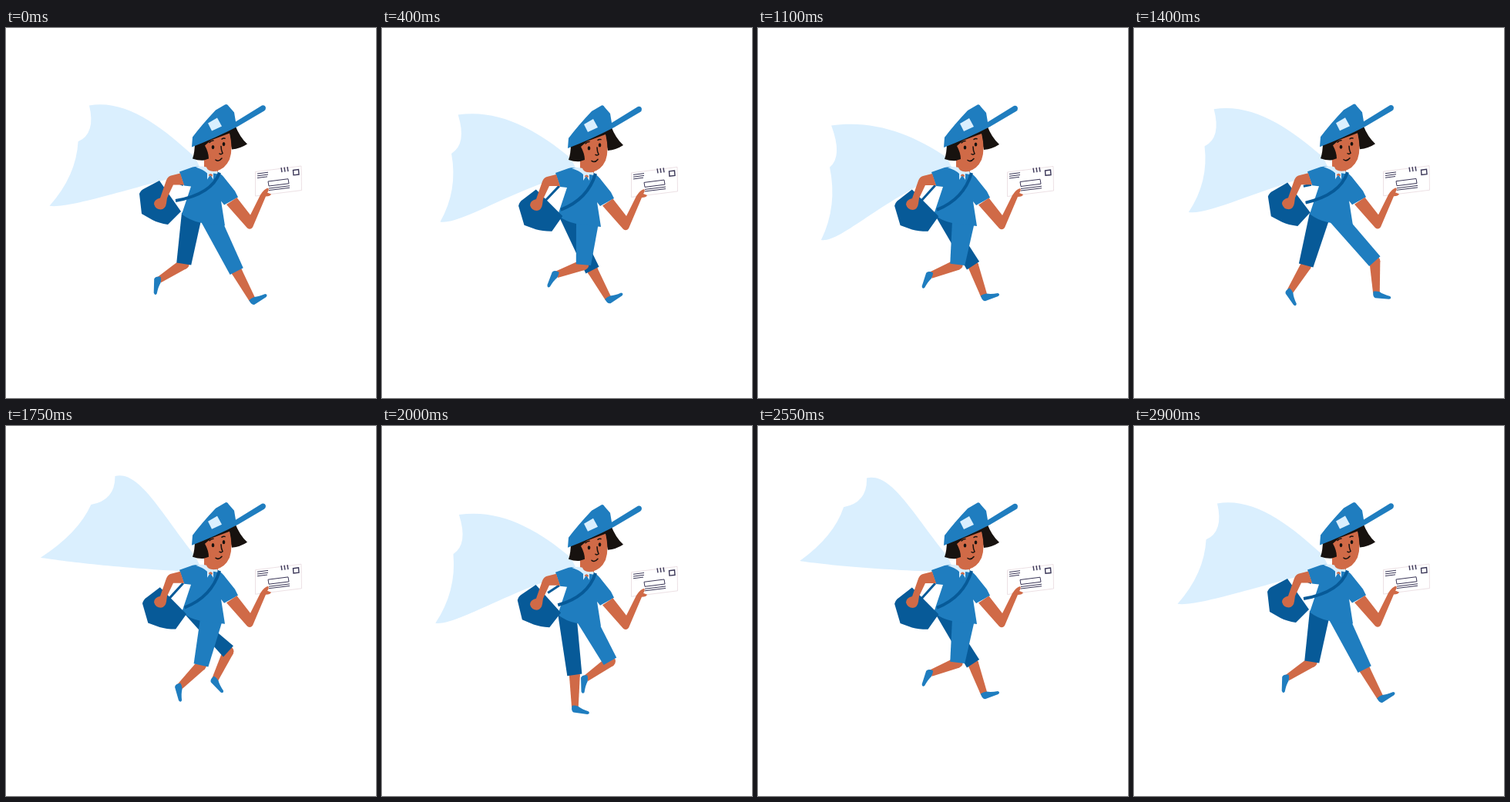
An HTML page that plays this animation: 480x480 px, repeating every 2950 ms.

```html
<!DOCTYPE html>
<html lang="en">
<head>
<meta charset="utf-8">
<title>Running courier</title>
<style>
  html, body { margin: 0; width: 100%; height: 100%; overflow: hidden; background: #fff; }
  svg { display: block; width: 100vw; height: 100vh; }
  .blue { fill: #1f7dbf; }
  .navy { fill: #075a98; }
  .skin { fill: #d06a47; }
  .hair { fill: #17120f; }
  .pale { fill: #daeffe; }
  .strap { fill: none; stroke: #075a98; stroke-width: 4; }
  .ink { fill: none; stroke: #3a3657; stroke-width: 1; }
  .face { fill: none; stroke: #17120f; stroke-width: 1.5; stroke-linecap: round; }
</style>
</head>
<body>
<svg viewBox="0 0 480 480">
  <path id="cape" class="pale"/>
  <g id="farLeg">
    <path class="skin shin"/><circle class="skin knee" r="7"/>
    <path class="blue foot"/><path class="navy thigh"/>
  </g>
  <g id="nearLeg">
    <path class="skin shin"/><circle class="skin knee" r="7"/>
    <path class="blue foot"/><path class="blue thigh"/>
  </g>
  <path id="backStrap" class="strap" style="stroke-width:3"/>

  <g class="bob">
    <path class="skin" d="M257 166L257 184Q264 194 274 187L277 178Z"/>
    <path class="blue" d="M225 185L242 179Q250 177 257 180Q264 190 274 185Q280 188 285 195L297 210L301 218L283 228L279 223L284 255L252 251Q238 248 228 240L240 204L231 203Z"/>
    <path class="pale" d="M246 179Q254 177 260 179Q262 186 274 184L275 188L269 187L269 195L265 189L261 195L261 187Q256 182 246 179Z"/>
    <path class="skin" d="M263 189Q265 186 268 189L267 192Q265 188 263 191Z"/>
  </g>

  <path id="bag" class="navy" d="M199 198L227 238L210 255Q198 253 190 249L176 241L173 215Q175 210 180 208Z"/>
  <path id="frontStrap" class="strap"/>

  <g class="bob">
    <path class="skin" d="M226 187L214 190Q210 191 208 196L200 219Q192 221 192 227Q194 234 201 234Q207 233 208 226L209 219L217 202L231 202Z"/>

    <path d="M323.500 185L383 177.500L383.500 209L323.500 216.500Z" fill="#fff" stroke="#e8d8de" stroke-width=".8"/>
    <path class="ink" d="M326 187.500l14 -1.800M326 190.300l14 -1.800M326 193l13 -1.700M340 197.500l26 -3.300l1 6l-26 3.300zM341 209l27 -3.300M341 206.500l27 -3.300"/>
    <path class="ink" style="stroke-width:1.400" d="M357 179.500l1 6M361 179l1 6M365 178.500l1 6M372.500 183l7 -.9l.5 6.400l-7 .8z"/>
    <path class="skin" d="M286 227.500L299.500 218.500L317 241L330 215Q335 207 340 206Q342 208 339 212L344 214Q343 217 337 217L320 257Q317 261 313 258Z"/>

    <path class="hair" d="M245 146Q245 160 242 168Q253 172 263 169L270 150L290 136Q290 146 293 156Q304 155 313 149Q303 140 297 124Z"/>
    <path class="skin" d="M258 151L266 144L290 135Q295 155 290 169Q284 182 272 184Q260 181 257 170L263 168Q263 160 258 151Z"/>
    <ellipse class="hair" cx="268.500" cy="153" rx="1.800" ry="2.600"/>
    <ellipse class="hair" cx="282.500" cy="149" rx="1.800" ry="2.600"/>
    <path class="face" d="M264 147q2 -2.500 5 -2.500M280 142.500q2 -1.500 4 -.8M279 152q0 5 2 9q-2 2 -4 .5M272 169.500q4 3 8 -2"/>
    <path class="blue" d="M241 153L242 140Q254 124 272 105L284 98Q287 96 289 100L296 108L298 120L332 99Q336 98 337 102Q337 105 335 106L301 126Q270 142 241 153Z"/>
    <path class="pale" d="M262 122L274 115L280 126L267 132Z"/>
  </g>
</svg>

<script>
const LOOP = 2950, STEP = 50, STRIDE = 725, WAVE = 2900 / 3;
const FAR_LAG = .45;
const $ = s => document.querySelector(s);
const setD = (el, d) => el.setAttribute('d', d);
const move = (el, t) => el.setAttribute('transform', t);
const wave = (p, peak = 0) => Math.cos(2 * Math.PI * (p - peak));

// One stride from heel strike: phase, thigh angle, shin angle (degrees forward of straight down).
const stride = [
  [0, 27, 29], [.1, 22, 8], [.24, 3, -2], [.347, -16, -20],
  [.45, -9, -57], [.55, -5, -70], [.72, 23, -62], [.88, 48, -20]
];

// Smooth periodic interpolation through the stride poses.
function pose(time) {
  const u = time - Math.floor(time), n = stride.length;
  const key = i => {
    const [p, ...v] = stride[(i + n) % n];
    return { p: p + Math.floor(i / n), v };
  };
  let i = n - 1;
  while (stride[i][0] > u) i--;
  const [a, b, c, d] = [-1, 0, 1, 2].map(k => key(i + k));
  const h = c.p - b.p, s = (u - b.p) / h, r = 1 - s;
  return b.v.map((v, j) => {
    const w = c.v[j];
    const m0 = (w - a.v[j]) / (c.p - a.p) * h;
    const m1 = (d.v[j] - v) / (d.p - b.p) * h;
    return r * r * ((1 + 2 * s) * v + s * m0) + s * s * ((1 + 2 * r) * w - r * m1);
  });
}

function drawLeg(id, phase, [lx, ly], [rx, ry], [hx, hy]) {
  const leg = $(id), part = c => leg.querySelector('.' + c);
  const [thigh, shin] = pose(phase);
  const dir = deg => [Math.sin(deg * Math.PI / 180), Math.cos(deg * Math.PI / 180)];
  const [tx, ty] = dir(thigh), [sx, sy] = dir(shin);
  const reach = wave(phase, .1);
  const kx = hx + tx * (65 + 10 * reach), ky = hy + ty * (65 + 10 * reach);
  const ax = kx + sx * (40 + 3 * reach), ay = ky + sy * (40 + 3 * reach);
  const side = (x, y, ux, uy, r) => `${x + uy * r} ${y - ux * r} `;
  setD(part('thigh'), `M${lx} ${ly}L${side(kx, ky, tx, ty, -9.6)}L${side(kx, ky, tx, ty, 9.6)}L${rx} ${ry}Z`);
  setD(part('shin'), `M${side(kx, ky, sx, sy, -7)}L${side(ax, ay, sx, sy, -4.3)}L${side(ax, ay, sx, sy, 4.3)}L${side(kx, ky, sx, sy, 7)}Z`);
  move(part('knee'), `translate(${kx} ${ky})`);
  move(part('foot'), `translate(${ax} ${ay}) rotate(${9 - 1.45 * shin})`);
}

function drawCape(q, dy) {
  const flutter = -5 * wave(2 * q, .92);
  const lift = wave(q, .735);
  const top = [115 + 28 * lift + flutter, 97 - 36 * lift];
  const notch = [99 + 11 * lift + flutter, 143 - 46 * lift];
  const low = [65 - 22 * wave(q, .78) + flutter, 225 - 61 * lift];
  const bend = (a, b, x, y) => [(a[0] + b[0]) / 2 + x, (a[1] + b[1]) / 2 + y];
  const lowPull = [155, low[1] * .4 + 117];
  const topPull = [201, top[1] * .4 + 87];
  setD($('#cape'), `M${top}Q${bend(top, notch, 16, 13)} ${notch}Q${bend(notch, low, 16, 3)} ${low}
    C${low[0] + 24} ${low[1] + 4} ${lowPull} 240 ${187 + dy}L252 ${180 + dy}L245 ${166 + dy}
    C${topPull} ${top[0] / 2 + 102} ${top[1] - 8} ${top}Z`);
}

function drawBag(s, dy) {
  move($('#bag'), `translate(${6 * s} ${11 * s}) rotate(${-10 * s} 200 228)`);
  const y = 224 + 12 * s;
  setD($('#frontStrap'), `M277 ${186 + dy}Q267 ${(186 + dy + y) / 2 + 10} ${220 + 12 * s} ${y}`);
  setD($('#backStrap'), `M230 ${202 + dy}L${222 - 10 * s} ${200 + 24 * s}`);
}

function draw(t) {
  const run = t / STRIDE;
  const dy = .4 + 4.6 * Math.abs(Math.sin(Math.PI * (2 * run + .08)));
  document.querySelectorAll('.bob').forEach(g => move(g, `translate(0 ${dy})`));
  drawLeg('#farLeg', run + FAR_LAG, [228, 238 + dy], [253, 248 + dy], [240, 246 + dy]);
  drawLeg('#nearLeg', run, [252, 248 + dy], [281, 250 + dy], [266, 249 + dy]);
  drawBag(Math.abs(Math.sin(Math.PI * run)), dy);
  drawCape(t / WAVE, dy);
}

document.querySelectorAll('.foot').forEach(f =>
  setD(f, 'M-4 -2Q-5 5 -1 6.500L17 6.500Q21 5 18 2.500Q9 1 4 -2Q0 -3 -4 -2Z'));

function tick() {
  draw(Math.floor(performance.now() % LOOP / STEP) * STEP);
  requestAnimationFrame(tick);
}
tick();
</script>
</body>
</html>
```
